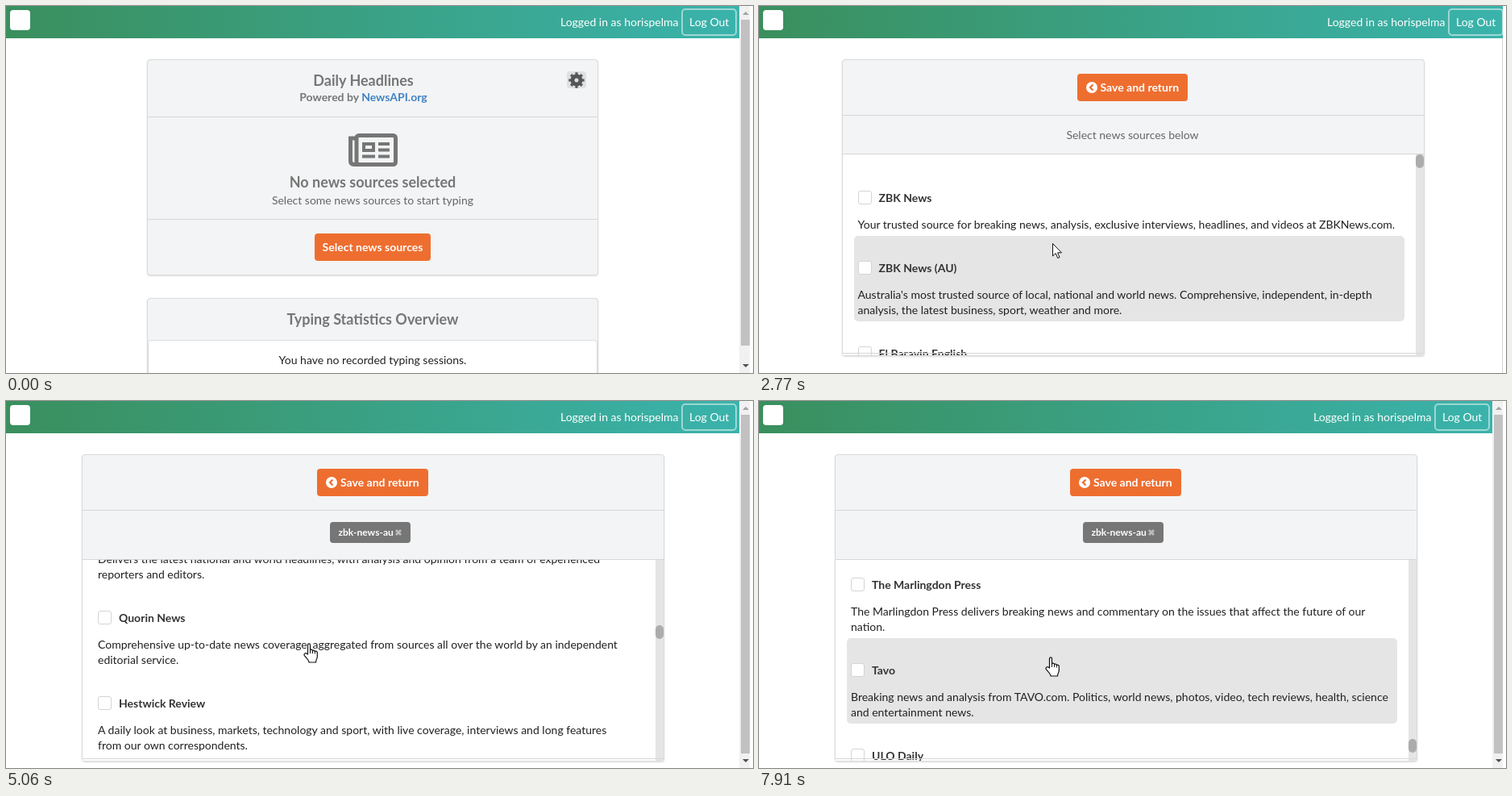
Write an HTML page that moves like this. It is 927x455 px and loops after 8 s.

```html
<!DOCTYPE html>
<html lang="en">
<head>
<meta charset="utf-8">
<title>News source picker</title>
<style>
html, body { margin: 0; width: 100%; height: 100%; overflow: hidden; background: #fff; }
body { position: relative; font: 14px/20px Lato, sans-serif; color: #212121; }
div, svg { position: absolute; box-sizing: border-box; }
.t { white-space: pre; height: 20px; }
.mid { transform: translateX(-50%); }
.b { font-weight: 700; }
.big { font-size: 18px; }
.gray { color: #767676; }
.soft { color: #666; }
.white { color: #fff; }
.panel { background: #f3f4f5; border: 1px solid #d9dadb; border-radius: 4px; box-shadow: 0 1px 2px rgba(34,36,38,.15); }
.rule { height: 1px; background: #d6d7d8; }
.btn { background: #ee6e30; border-radius: 4px; }
.btn.hover { background: #f0620f; }
.btn.press { background: #cf590c; }
.list { background: #fff; overflow: hidden; }
.item { left: 14px; width: 683px; border-radius: 5px; }
.item.on { background: #e5e5e5; }
.box { left: 5px; top: 31px; width: 17px; height: 17px; background: #fff; border: 1px solid #d4d4d5; border-radius: 3px; }
#stage { left: 0; top: 0; width: 927px; height: 455px; overflow: hidden; background: #fff; }
#bar { left: 0; top: 0; height: 40px; background: linear-gradient(90deg, #3a8f5d, #3ab3ac); overflow: hidden; }
</style>
</head>
<body>
<div id="stage"></div>
<script>
const LOOP = 8000;
const stage = document.getElementById('stage');

function add(parent, cls, css, html = '') {
  const el = document.createElement('div');
  el.className = cls;
  el.style.cssText = css;
  el.innerHTML = html;
  parent.append(el);
  return el;
}
const rect = (x, y, w, h) => `left:${x}px;top:${y}px;width:${w}px;height:${h}px;`;
// y is the middle of the line
const text = (p, x, y, str, cls = '') => add(p, 't ' + cls, `left:${x}px;top:${y - 10}px`, str);
const rule = (p, x, y, w) => add(p, 'rule', `left:${x}px;top:${y}px;width:${w}px`);
const icon = (p, x, y, w, h, body) =>
  add(p, '', rect(x, y, w, h), `<svg width="${w}" height="${h}" style="left:0;top:0;overflow:visible">${body}</svg>`);
const show = (el, on) => { el.style.display = on ? '' : 'none'; };

// Home page
const home = add(stage, '', rect(0, 0, 927, 455));
add(home, 'panel', rect(175, 66, 560, 268));
text(home, 443, 92, 'Daily Headlines', 'mid b big gray');
text(home, 443.5, 113, 'Powered by <span style="color:#4183c4">NewsAPI.org</span>', 'mid b gray');
add(home, '', rect(696, 81, 24, 21) + 'background:#dfe0e1;border-radius:4px');
icon(home, 708, 91.5, 1, 1, `<g fill="none" stroke="#555">
  <circle r="5" stroke-width="5"/>
  <circle r="8" stroke-width="3.4" pathLength="16" stroke-dasharray="1 1" stroke-dashoffset=".5"/></g>`);
rule(home, 176, 137, 558);
icon(home, 425, 158, 61, 41, `<g fill="none" stroke="#767676" stroke-width="5">
  <rect x="10" y="2.5" width="48.5" height="36" rx="3"/>
  <path d="M10 6H2.5V34Q2.5 38.500 7 38.500H14"/>
  <path stroke-width="4" d="M19 13H31V21H19ZM37 13H51M37 20.500H51M17 28.500H33M37 28.500H51"/></g>`);
text(home, 455, 218, 'No news sources selected', 'mid b big gray');
text(home, 455, 241, 'Select some news sources to start typing', 'mid soft');
rule(home, 176, 264, 558);
const pick = add(home, 'btn', rect(383, 282, 144, 34));
text(home, 455, 299, 'Select news sources', 'mid b white');
add(home, 'panel', rect(175, 362, 560, 120));
text(home, 455, 388, 'Typing Statistics Overview', 'mid b big gray');
add(home, '', rect(176, 414, 558, 60) + 'background:#fff;border:1px solid #dcddde;border-radius:4px');
text(home, 455, 439, 'You have no recorded typing sessions.', 'mid');
for (const el of home.querySelectorAll('.mid.b.big')) if (el.style.left === '443px') el.style.left = '443.5px';

// Source list
const known = {
  0: ['ZBK News', 'Your trusted source for breaking news, analysis, exclusive interviews, headlines, and videos at ZBKNews.com.'],
  1: ['ZBK News (AU)', "Australia's most trusted source of local, national and world news. Comprehensive, independent, in-depth",
    'analysis, the latest business, sport, weather and more.'],
  2: ['El Baravin English', 'News, analysis from the region and worldwide, multimedia and interactives, opinions, documentaries,',
    'podcasts, long reads and broadcast schedule.'],
  15: ['Kriva Tokens News', 'Providing breaking cryptocurrency news - focusing on Dravnel, Oranthum, ICOs, blockchain technology, and',
    'smart contracts.'],
  16: ['Vorplint', 'Vorplint is a web magazine with obsessive daily coverage of everything new in gadgets and consumer', 'electronics.'],
  17: ['Screenlantern Weekly', 'Online version of the print magazine includes entertainment news, interviews, reviews of music, film,',
    'TV and books, and a special area for subscribers.'],
  42: ['Brontav', 'Brontav is a gaming website in partnership with Kel Media. Our culture focused site covers games, their',
    'creators, the fans, trending stories and entertainment news.'],
  43: ['Navilo', 'Get the latest independent tech news, reviews and analysis from Navilo with the most informed and respected',
    'journalists in technology and media.'],
  44: ['Tablop /r/all', 'Tablop is an entertainment, social news and discussion website where members submit content such as',
    'text posts or direct links.'],
  59: ['The Marlingdon Press', 'The Marlingdon Press delivers breaking news and commentary on the issues that affect the future of our', 'nation.'],
  60: ['Tavo', 'Breaking news and analysis from TAVO.com. Politics, world news, photos, video, tech reviews, health, science',
    'and entertainment news.'],
  61: ['ULO Daily', 'Get the latest national, international, and political news at ULODAILY.com.'],
  62: ['Drel News', "Drel News is Drel Media, Inc.'s current affairs channel, producing daily documentary essays and video through",
    'its website and ClipNub channel. It promotes itself on its coverage of "under - reported stories".'],
  63: ['Plexorn', 'Plexorn is a monthly magazine that reports on how emerging technologies affect culture and politics.']
};
const heads = ['Morvane', 'Feldary', 'Quorin', 'Hestwick', 'Lumbrel'];
const tails = ['Report', 'Daily', 'News', 'Review'];
const blurbs = [
  ['Delivers the latest national and world headlines, with analysis and opinion from a team of experienced', 'reporters and editors.'],
  ['Comprehensive up-to-date news coverage, aggregated from sources all over the world by an independent', 'editorial service.'],
  ['A daily look at business, markets, technology and sport, with live coverage, interviews and long features', 'from our own correspondents.']
];
const source = i => known[i] || [heads[i % 5] + ' ' + tails[i % 4], ...blurbs[i % 3]];

const picker = add(stage, '', rect(0, 0, 740, 455));
const frame = add(picker, 'panel', rect(0, 66, 723, 380));
const save = add(picker, '', rect(292, 84, 138, 34));
add(save, 'btn', rect(0, 0, 137.5, 34));
icon(save, 11, 10, 14, 14, `<circle cx="7" cy="7" r="7" fill="#fff"/>
  <path d="M8.500 3.500L5 7L8.500 10.500" fill="none" stroke="#ee6e30" stroke-width="2.200"/>`);
text(save, 29, 17, 'Save and return', 'b white');
rule(picker, 1, 135, 721);
const hint = text(picker, 361, 160, 'Select news sources below', 'mid soft');
const tag = add(picker, '', rect(308, 150, 100, 26) + 'background:#767676;border-radius:4px');
text(tag, 10.5, 13, 'zbk-news-au', 'b white').style.fontSize = '12px';
icon(tag, 81, 9, 8, 8, '<path d="M1 1L7 7M7 1L1 7" stroke="#bbb" stroke-width="2.800"/>');
const split = rule(picker, 1, 183, 721);
const list = add(picker, 'list', rect(1, 184, 721, 249));
const rows = add(list, '', rect(0, 0, 700, 1));
const items = [];
let y = 14;
for (let i = 0; i < 64; i++) {
  const [name, ...lines] = source(i);
  const h = 68 + 19 * lines.length;
  const el = add(rows, 'item', `top:${y}px;height:${h}px`);
  add(el, 'box', '');
  text(el, 31, 40, name, 'b').style.color = '#333';
  lines.forEach((line, n) => text(el, 5, 73 + 19 * n, line));
  items.push(el);
  y += h;
}
const tick = icon(items[1], 5, 31, 17, 17, '<path d="M4 8.500L7.500 12L13 5" fill="none" stroke="#333" stroke-width="2"/>');
add(list, '', rect(711, 0, 11, 300) + 'background:#e5e5e5');
const thumb = add(list, '', rect(711, 0, 10, 17) + 'background:#acacac;border-radius:5px');
const foot = rule(picker, 1, 430, 721);

// Header and browser scrollbar
const bar = add(stage, '', '');
bar.id = 'bar';
add(bar, '', rect(5, 5, 25, 25) + 'background:#fff;border-radius:4px');
const account = add(bar, '', rect(0, 0, 927, 40));
text(account, 688, 20, 'Logged in as horispelma', 'white');
add(account, '', rect(838, 3, 69, 34) + 'border:2px solid rgba(255,255,255,.5);border-radius:5px');
text(account, 848, 20, 'Log Out', 'white');
const edge = add(stage, '', rect(922, 40, 1, 415) + 'background:#d4d4d4');
const scroller = add(stage, '', rect(910, 0, 13, 455) + 'background:#f1f1f1');
const grip = add(scroller, '', rect(2, 17, 11, 404) + 'background:#c1c1c1');
icon(scroller, 0, 0, 13, 455, '<path d="M4 11L8 7L12 11Z" fill="#a3a3a3"/><path d="M4 444L8 448L12 444Z" fill="#505050"/>');

// Pointers
const ink = 'fill="#fff" stroke="#111" stroke-linejoin="round"';
const arrow = icon(stage, 0, 0, 12, 19, `<path ${ink} d="M.5.5V16L4.200 12.600L6.700 18.500L9 17.500L6.600 11.800H11.500Z"/>`);
const hand = icon(stage, 0, 0, 18, 25, `<path ${ink} stroke-width="1.200"
  d="M5.500 14V2.500C5.500.200 8.500.200 8.500 2.500V9C9 7.700 11.500 8 11.500 9.600C12 8.600 14.300 9 14.300 10.600C15 9.800 17.300 10.400 17.300 12V17C17.300 19.500 15.500 20.500 15.500 24H7C7 21.500 4 19 1.200 15.400C.2 13.500 2.500 12 4 13Z"/>
  <path d="M8.500 9V13M11.500 9.600V13M14.300 10.600V13.500" stroke="#111"/>`);

const pointer = [
  [0], [80, arrow, 600, 390], [180, arrow, 568, 364], [280, arrow, 530, 338],
  [380, hand, 484, 304], [480, hand, 438, 290],
  [1540, hand, 437, 281], [1640, hand, 436, 277], [1760, hand, 434, 276],
  [2100, hand, 420, 279], [2210, hand, 388, 288], [2320, hand, 358, 293],
  [2770, arrow, 364, 294], [2850, hand, 369, 300],
  [7820, hand, 362, 309], [7910, hand, 355, 317]
];
const press = [[0, ''], [380, 'hover'], [690, 'press'], [870, 'hover']];
const lit = [[0, -1], [1540, 0], [2210, 1], [3240, -1], [7820, 60]];
// Wheel bursts: start, step count, step length, from, to
const bursts = [
  [3240, 6, 116, 0, 1150], [4180, 2, 100, 1150, 1590], [4880, 4, 93, 1590, 3000],
  [5460, 3, 95, 3000, 4290], [5950, 3, 100, 4290, 4809], [6330, 4, 100, 4809, 6509]
];
const wheel = [[0, 0]];
for (const [start, n, gap, from, to] of bursts)
  for (let k = 1; k <= n; k++) wheel.push([start + (k - 1) * gap, Math.round(from + (to - from) * k / n)]);
wheel.push([6930, 6395], [7080, 6285], [7180, 6258]);

const at = (steps, ms) => steps.findLast(s => s[0] <= ms);

function draw(ms) {
  const onHome = ms < 1230;
  const chosen = ms >= 2850;
  const wide = !onHome && !chosen;
  show(home, onHome);
  show(picker, !onHome);
  pick.className = 'btn ' + at(press, ms)[1];

  bar.style.width = (wide ? 923 : 910) + 'px';
  account.style.left = (wide ? 17 : 0) + 'px';
  show(scroller, !wide);
  show(edge, wide);
  grip.style.height = (onHome ? 404 : 420) + 'px';

  const top = chosen ? 197 : 184;
  picker.style.left = (wide ? 102.5 : 94) + 'px';
  frame.style.height = top + 184 + (chosen ? 0 : 0) - top + 'px';
  frame.style.height = top + 250 - 66 + 'px';
  split.style.top = top - 1 + 'px';
  list.style.top = top + 'px';
  foot.style.top = top + 246 + 'px';
  show(hint, !chosen);
  show(tag, chosen);
  show(tick, chosen);

  const scroll = at(wheel, ms)[1];
  rows.style.top = -scroll + 'px';
  thumb.style.top = scroll * .0355 + 'px';
  const hot = at(lit, ms)[1];
  items.forEach((el, i) => el.classList.toggle('on', i === hot));

  const [, kind, x, py] = at(pointer, ms);
  show(arrow, kind === arrow);
  show(hand, kind === hand);
  if (kind) {
    kind.style.left = x + 'px';
    kind.style.top = py + 'px';
  }
}

const begin = performance.now();
function tickFrame() {
  draw((performance.now() - begin) % LOOP);
  requestAnimationFrame(tickFrame);
}
tickFrame();
</script>
</body>
</html>
```
